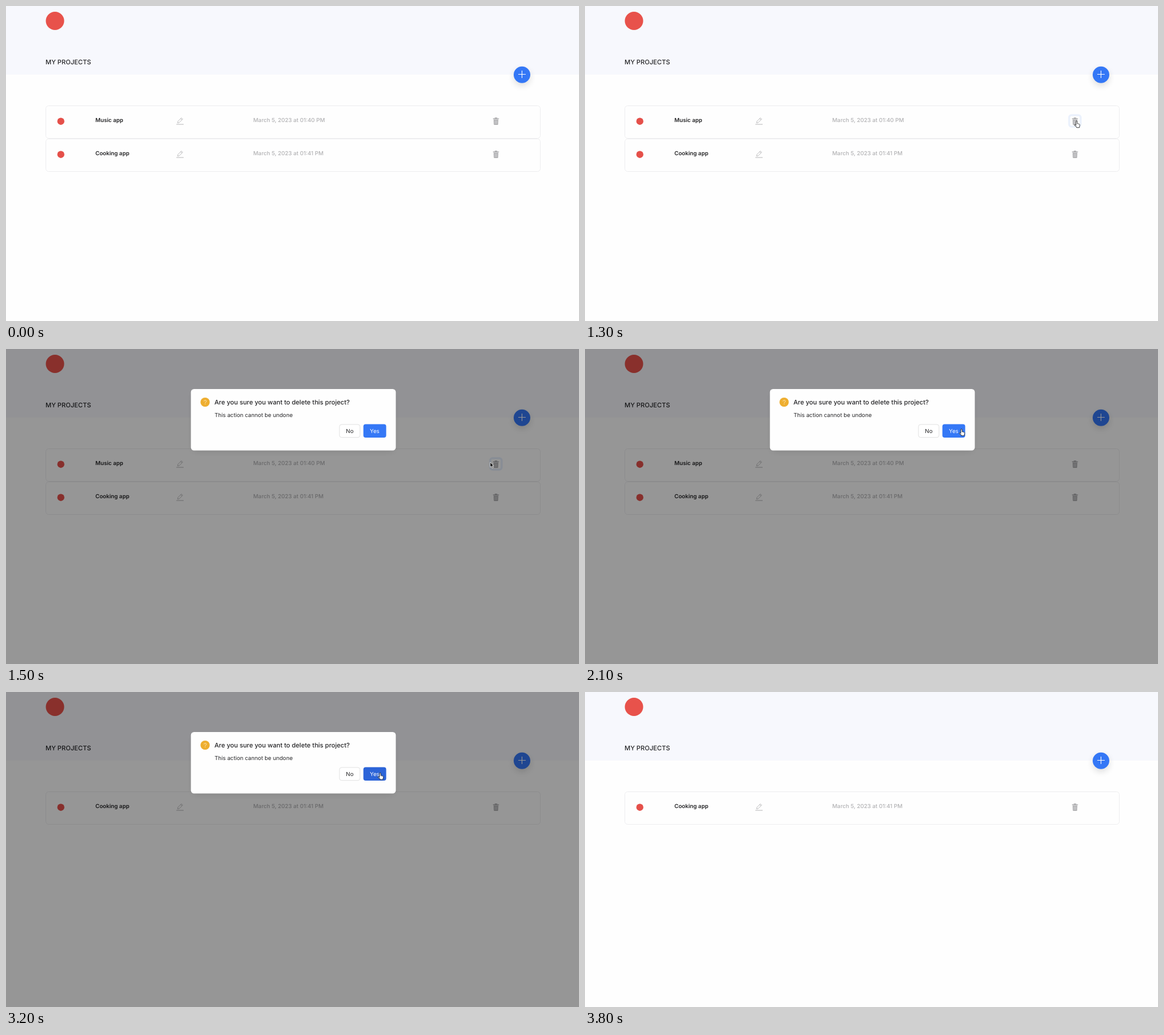
Animation, 1000 px wide and 551 px high, one loop 4.7 s. Source, as an HTML page:

```html
<!DOCTYPE html>
<html lang="en">
<head>
<meta charset="utf-8">
<title>My projects</title>
<style>
  html, body { margin: 0; width: 100%; height: 100%; overflow: hidden; background: #fefefe; }
  svg { display: block; width: 1000px; height: 551px; }
  text { font: 400 9.72px Inter, sans-serif; fill: #262628; text-rendering: geometricPrecision; }
  .title { font-size: 11.11px; font-weight: 500; }
  .name { font-weight: 600; }
  .date { font-weight: 500; fill: #b2b2b4; }
  .mid { text-anchor: middle; }

  /* One loop; the picture advances in 100 ms ticks */
  .anim { animation: 4.7s step-end infinite; }
  #music { animation-name: remove; }
  #cooking { animation-name: shift; }
  #wave { animation-name: wave; }
  #mask { animation-name: mask; }
  #modal { animation-name: modal; }
  #yes { animation-name: press; }
  #pointer { animation-name: move; }
  #arrow { animation-name: arrow; }
  #hand { animation-name: hand; }

  @keyframes remove { 0% { opacity: 1; } 65.95%, 100% { opacity: 0; } }
  @keyframes shift {
    0% { transform: translateY(0); }
    65.95%, 100% { transform: translateY(-58px); }
  }
  @keyframes wave {
    0% { opacity: 0; }
    27.65% { opacity: .4; }
    29.78% { opacity: 1; }
    31.91% { opacity: .5; }
    34.04%, 100% { opacity: 0; }
  }
  @keyframes mask {
    0% { opacity: 0; }
    29.78% { opacity: .27; }
    31.91% { opacity: .41; }
    70.21% { opacity: .2; }
    72.34% { opacity: .04; }
    74.46%, 100% { opacity: 0; }
  }
  @keyframes modal {
    0% { opacity: 0; transform: translate(690px, 163px) scale(.2); }
    29.78% { opacity: .95; transform: translate(70.2px, 16.7px) scale(.919); }
    31.91% { opacity: 1; transform: none; }
    70.21% { opacity: .55; transform: translate(418.4px, 98.2px) scale(.5126); }
    72.34%, 100% { opacity: 0; transform: translate(690px, 163px) scale(.2); }
  }
  @keyframes press {
    0% { fill: #3578f6; }
    63.82% { fill: #2c64d8; }
    72.34%, 100% { fill: #3578f6; }
  }
  @keyframes move {
    0%, 4.25% { transform: translate(912px, 528px); }
    6.38% { transform: translate(900px, 420px); }
    8.51% { transform: translate(888px, 310px); }
    10.63% { transform: translate(878px, 245px); }
    12.76% { transform: translate(870px, 212px); }
    14.89% { transform: translate(866.5px, 197.5px); }
    17.02% { transform: translate(861px, 200px); }
    19.14% { transform: translate(858px, 201px); }
    31.91% { transform: translate(845px, 198px); }
    34.04% { transform: translate(790px, 184px); }
    36.17% { transform: translate(725px, 164px); }
    38.29% { transform: translate(682px, 150px); }
    40.42% { transform: translate(662px, 143px); }
    42.55% { transform: translate(657px, 140px); }
    46.8% { transform: translate(655px, 140.5px); }
    48.93% { transform: translate(653px, 141.5px); }
    74.46% { transform: translate(656px, 156px); }
    76.59% { transform: translate(668px, 260px); }
    78.72%, 100% { transform: translate(685px, 430px); }
  }
  @keyframes arrow {
    0% { opacity: 0; }
    4.25% { opacity: 1; }
    17.02% { opacity: 0; }
    31.91% { opacity: 1; }
    40.42% { opacity: 0; }
    72.34% { opacity: 1; }
    80.85%, 100% { opacity: 0; }
  }
  @keyframes hand {
    0% { opacity: 0; }
    17.02% { opacity: 1; }
    31.91% { opacity: 0; }
    40.42% { opacity: 1; }
    72.34%, 100% { opacity: 0; }
  }
</style>
</head>
<body>
<svg viewBox="0 0 1000 551">
  <defs>
    <filter id="soft" x="-100%" y="-100%" width="300%" height="300%">
      <feGaussianBlur stdDeviation="6"/>
    </filter>
    <g id="row">
      <rect x="69.5" y="174.5" width="863" height="57" rx="5" fill="#fefefe" stroke="#ededef"/>
      <circle cx="95.7" cy="201.7" r="6.2" fill="#e5504a"/>
      <g fill="none" stroke="#b4b4b6">
        <path d="M297.3 207H310"/>
        <path d="M299.5 204.6l.6-3 6-6 2.3 2.3-6 6zM304.8 197l2.2 2.2" stroke-width=".9"/>
      </g>
      <path d="M853.2 195h3.8l.7 1.4h2.6v1.5h-10.4v-1.5h2.6zM850.9 198.6h8.4l-.4 8.2q-.1 1.2-1.2 1.2h-5.2q-1.1 0-1.2-1.2z" fill="#b2b2b4"/>
      <path d="M853.2 200.3v5.9m1.9-5.9v5.9m1.9-5.9v5.9" stroke="#dcdcde" stroke-width=".7"/>
    </g>
  </defs>

  <rect width="1000" height="551" fill="#fefefe"/>
  <rect width="1000" height="120" fill="#f7f8fd"/>
  <circle cx="85.5" cy="26" r="16" fill="#e8524b"/>
  <text class="title" x="69" y="102">MY PROJECTS</text>

  <circle cx="900.5" cy="125" r="14.5" opacity=".13" filter="url(#soft)"/>
  <circle cx="900.5" cy="120.3" r="14.5" fill="#3477f6"/>
  <path d="M894 119.5h13M900.5 113v13" stroke="#fff" stroke-width="1.1"/>

  <g id="music" class="anim">
    <use href="#row"/>
    <text class="name" x="156" y="203.2">Music app</text>
    <text class="date" x="431.5" y="203.2">March 5, 2023 at 01:40 PM</text>
  </g>
  <g id="cooking" class="anim">
    <use href="#row" y="58"/>
    <text class="name" x="156" y="261.2">Cooking app</text>
    <text class="date" x="431.5" y="261.2">March 5, 2023 at 01:41 PM</text>
  </g>
  <rect id="wave" class="anim" x="845" y="191" width="20" height="20" rx="4" fill="none" stroke="#cfe0fb" stroke-width="3.5"/>

  <rect id="mask" class="anim" width="1000" height="551"/>

  <g id="modal" class="anim">
    <rect x="327" y="78" width="349" height="100" rx="6" opacity=".13" filter="url(#soft)"/>
    <rect x="322.7" y="70" width="357.6" height="107.5" rx="5.5" fill="#fefefe"/>
    <circle cx="347.5" cy="93" r="8.1" fill="#eeae30"/>
    <path d="M345.6 91.6c0-2.7 4-2.5 4-.1 0 1.6-2 1.5-2 3.2m0 1.2v1" fill="none" stroke="#fff3d6" stroke-width=".9"/>
    <text class="title" x="363.7" y="97.2">Are you sure you want to delete this project?</text>
    <text x="363.9" y="118.7">This action cannot be undone</text>
    <rect x="582" y="132" width="35.8" height="22.7" rx="3.8" fill="#fff" stroke="#dadada" stroke-width=".8"/>
    <text class="mid" x="599.9" y="146.8">No</text>
    <rect id="yes" class="anim" x="623.7" y="131.6" width="39.8" height="23.4" rx="4"/>
    <text class="mid" x="643.4" y="146.8" style="fill:#fff">Yes</text>
  </g>

  <g id="pointer" class="anim">
    <path id="arrow" class="anim" d="M0 0v8.6l1.9-1.7 1.5 3.3 1.4-.6-1.4-3.2h2.7z" fill="#111" stroke="#fff" stroke-width=".7"/>
    <path id="hand" class="anim" d="M-1.1 1a1.1 1.1 0 0 1 2.2 0v3.8l1.2.1 1.3.4 1.3.5q.8.4.7 1.6l-.7 2.7v1.6h-5v-1.2L-3.6 8c-.7-1.1.4-1.9 1.3-1.1l1.2 1z" fill="#fff" stroke="#111" stroke-width=".8" stroke-linejoin="round"/>
  </g>
</svg>
</body>
</html>
```
